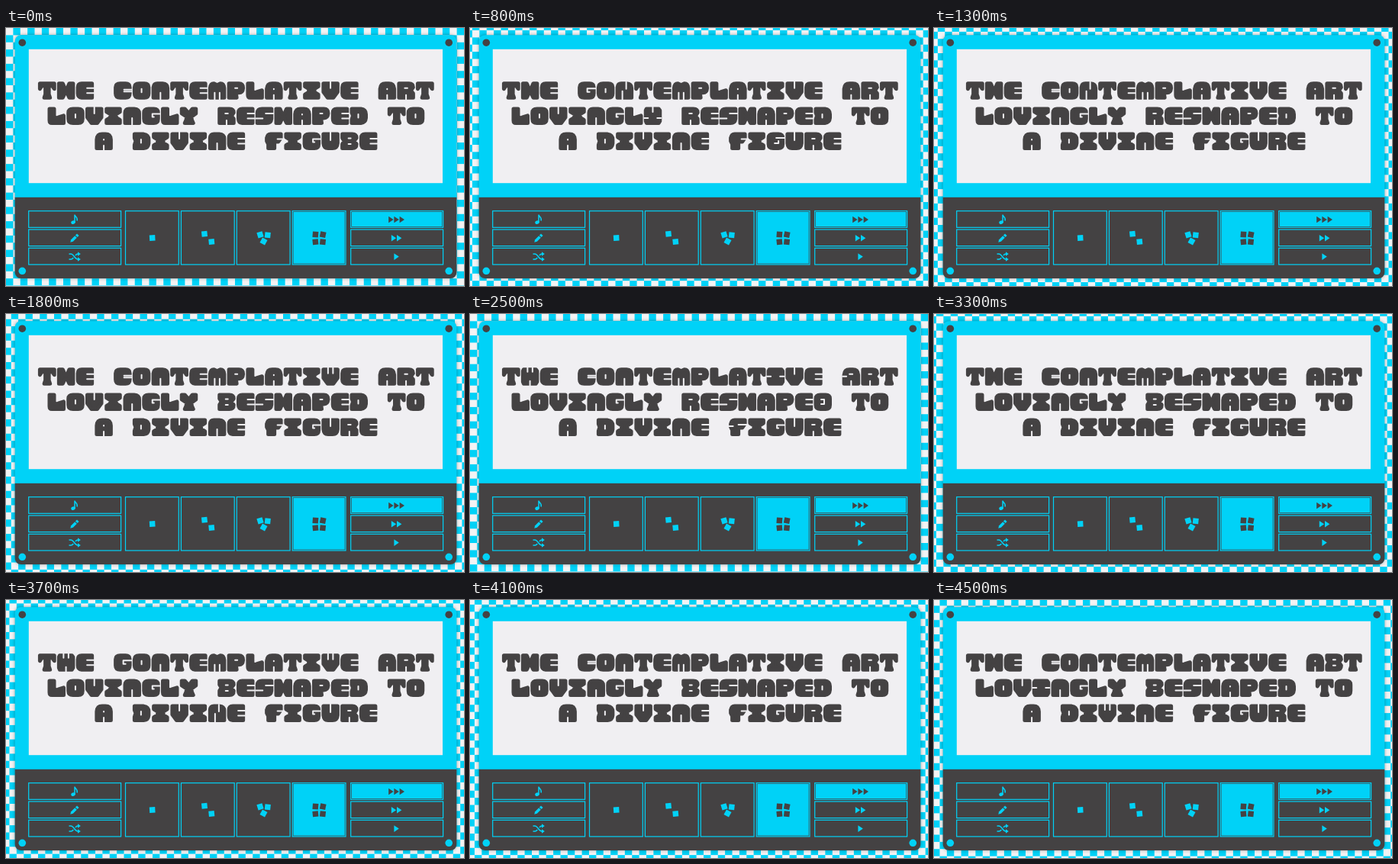
An HTML page with a canvas for the animation above (4.6 s loop, 600 px wide and 338 px high).

```html
<!DOCTYPE html>
<html lang="en">
<head>
<meta charset="utf-8">
<title>Lettering panel</title>
<style>
  html, body { margin: 0; width: 100%; height: 100%; overflow: hidden; background: #f3f3f4; }
  canvas { display: block; width: 100vw; height: 100vh; }
</style>
</head>
<body>
<canvas id="stage" width="600" height="338" role="img"
  aria-label="The contemplative art lovingly reshaped to a divine figure"></canvas>
<script>
const ctx = document.getElementById('stage').getContext('2d');
const CYAN = '#00d2f7', DARK = '#444243', PAPER = '#f0eff2';
const STEP = 100, STEPS = 46, CELL = 9.375, SCROLL = 2500;

// Each letter: body outline, slits, slits of the alternate, optional alternate body.
const block = 'M4 3H20L21.5 5V19L20 21.5H4L3 19V5Z';
const blob = 'M9 3H16Q21.5 3 21.5 8V16Q21.5 21.5 16 21.5H9Q3 21.5 3 16V8Q3 3 9 3Z';
const GLYPHS = {
  A: ['M3 21.5V10Q3.5 3 10 3H14.5Q21 3 21.5 10V21.5Z', 'M12.2 10V10.5M12.2 18V24', 'M1 12H6M10 9H14M12.2 18V24'],
  C: [blob, 'M24 11H14M24 13.5H14', 'M24 9.5H13V14H16'],
  D: ['M3 3H15Q21.5 4 21.5 10V15Q21 21 15 21.5H3V17L4.5 12L3 8Z', 'M11.5 10V14.5', 'M10 9H14V15H10', blob],
  E: ['M8 3H21.5V21.5H8Q3 21 3 16V8Q3 3 8 3Z', 'M24 9H15M24 15.5H15', 'M24 9H11M24 15H11'],
  F: ['M8 3H21.5V8L18 13H13V21.5H5V16L3 12V8Q4 3 8 3Z', 'M24 9.5H17', 'M24 9H13M1 11H6'],
  G: [blob, 'M24 9.5H14V13.5H16', 'M24 8H13M11 15H16V12'],
  H: ['M3 3H8L10.5 9H14L16.5 3H21.5V21.5H16.5L14 16H10.5L8 21.5H3Z', '', 'M9 0V6M15.5 0V6M12.2 24V18', block],
  I: ['M3.5 3H21V7L16 10V14.5L21 17.5V21.5H3.5V17.5L8.5 14.5V10L3.5 7Z', '', 'M1 12H6M18 12H23', block],
  L: ['M3 3H9V13Q12 16 15 14L21.5 12V21.5H6Q3 21.5 3 18Z', '', ''],
  M: ['M3 21.5V9Q3.5 3 8 3L12.2 5L16.5 3Q21 3 21.5 9V21.5Z', 'M9 24V15M15.5 24V15', 'M9 24V11M15.5 24V11'],
  N: ['M3 21.5V8Q3.5 3 8 3H15Q21.5 3.5 21.5 9V21.5Z', 'M12.2 24V15', 'M9.5 24V13M14.5 1V10'],
  O: [blob, 'M12.2 10V14.5', 'M11 10V14M13 10V14'],
  P: ['M3 3H16Q21.5 3 21.5 9Q21 15 16 15H12L13 21.5H3Z', 'M11 9H14', 'M12 8V10'],
  R: ['M3 3H16Q21.5 3 21.5 8L18.5 12.5L21.5 16V21.5H3Z', 'M10.5 9H14M12.2 24V18', 'M11 8.5H14M11 16H14',
      'M3 3H16Q21.5 3 21.5 8L18.5 12L21.5 16Q21.5 21.5 16 21.5H3V16L5.5 12L3 8Z'],
  S: ['M9 3H21.5V16Q21 21.5 15 21.5H3V8Q3.5 3 9 3Z', 'M24 9H14M1 15.5H10', 'M24 9H11M1 15H13'],
  T: ['M2.8 3H21.6V10L19 6H14.5V17L16 21.5H8.5L10 17V6H5.4L2.8 10Z', '', ''],
  U: ['M3 3H21.5V15Q21 21.5 15 21.5H9Q3.5 21.5 3 15Z', 'M12.2 0V11', 'M11 0V12M13 0V12'],
  V: ['M3 3H21.5V14L16 21.5H8.5L3 14Z', 'M12.2 0V9', 'M9 0V8M15.5 0V8'],
  Y: ['M3 3H7L12.2 9L17 3H21.5V9L16 13V17L18 21.5H7L9 17V13L3 9Z', '', 'M12.2 0V7M1 15H6M18 15H23', block]
};
for (const g of Object.values(GLYPHS))
  for (let i = 0; i < 4; i++) g[i] = new Path2D(g[i] ?? g[0]);

const LINES = ['THE CONTEMPLATIVE ART', 'LOVINGLY RESHAPED TO', 'A DIVINE FIGURE'];

// line, column, first and last step of an alternate letter
const SWAPS = [
  [2, 13, 0, 4], [0, 4, 6, 11], [0, 6, 7, 13], [1, 7, 5, 10], [2, 11, 8, 12],
  [1, 9, 15, 21], [0, 15, 17, 19], [0, 1, 23, 27], [0, 14, 22, 26], [0, 18, 24, 29],
  [2, 9, 24, 28], [1, 16, 25, 27], [1, 9, 29, 45], [0, 1, 35, 39], [0, 4, 36, 40],
  [0, 15, 34, 38], [2, 6, 36, 38], [0, 19, 42, 45], [2, 4, 43, 45], [1, 3, 42, 45]
];

function disc(x, y, r, color) {
  ctx.fillStyle = color;
  ctx.beginPath();
  ctx.arc(x, y, r, 0, 7);
  ctx.fill();
}

function rect(x, y, w, h, color) {
  ctx.fillStyle = color;
  ctx.fillRect(x, y, w, h);
}

function poly(color, ...pts) {
  ctx.fillStyle = color;
  ctx.beginPath();
  for (let i = 0; i < pts.length; i += 2) ctx.lineTo(pts[i], pts[i + 1]);
  ctx.fill();
}

// A diagonal move of one cell brings the pattern back to itself.
function checker(t) {
  const shift = t % SCROLL / SCROLL * CELL;
  rect(0, 0, 600, 338, '#f3f3f4');
  ctx.fillStyle = CYAN;
  for (let r = -1; r < 37; r++)
    for (let c = -1; c < 65; c++)
      if ((r + c) % 2) ctx.fillRect(c * CELL + shift, r * CELL + shift, CELL, CELL);
}

function panel() {
  ctx.save();
  ctx.beginPath();
  ctx.roundRect(11.7, 9.2, 578.6, 318.8, 8);
  ctx.shadowColor = 'rgba(0,0,0,.35)';
  ctx.shadowBlur = 4;
  ctx.fillStyle = CYAN;
  ctx.fill();
  ctx.shadowColor = 'transparent';
  ctx.clip();
  rect(11, 221.8, 580, 108, DARK);
  ctx.restore();
  rect(29.8, 27.8, 542.2, 175.4, PAPER);
  for (const x of [21.3, 580.2]) {
    disc(x, 19.2, 4.8, DARK);
    disc(x, 318.3, 4.8, CYAN);
  }
}

function button(x, y, w, h, on) {
  ctx.strokeStyle = CYAN;
  ctx.lineWidth = 1.2;
  ctx.strokeRect(x + .7, y + .7, w - 1.4, h - 1.4);
  if (on) rect(x + 2, y + 2, w - 4, h - 4, CYAN);
}

function tile(x, y, turn, color = CYAN) {
  ctx.save();
  ctx.translate(x, y);
  ctx.rotate(turn);
  rect(-3.7, -3.7, 7.4, 7.4, color);
  ctx.restore();
}

function arrows(n, y, color) {
  for (let i = 0; i < n; i++) {
    const x = 512 + (i - n / 2) * 7.2;
    poly(color, x, y - 4.3, x + 6.4, y, x, y + 4.3);
  }
}

function icons() {
  // note
  ctx.fillStyle = CYAN;
  ctx.beginPath();
  ctx.ellipse(88, 254.7, 2.8, 2.2, -.3, 0, 7);
  ctx.fill();
  ctx.strokeStyle = CYAN;
  ctx.lineWidth = 1.5;
  ctx.stroke(new Path2D('M90 255V244.5C90.5 247.5 94.5 248 93 252.5'));
  // pencil
  poly(CYAN, 84.2, 280.8, 85.2, 277.2, 90.2, 272.2, 92.8, 274.8, 87.8, 279.8);
  poly(CYAN, 90.9, 271.5, 93, 269.4, 95.6, 272, 93.5, 274.1);
  // shuffle
  ctx.stroke(new Path2D('M82.5 296H85C89 296 90 303 94 303H95M82.5 303H85C86.5 303 87.5 302 88.3 301M91 298C91.8 296.8 92.6 296 94 296H95'));
  for (const y of [296, 303]) poly(CYAN, 94, y - 2.8, 97.8, y, 94, y + 2.8);
}

function controls() {
  for (let i = 0; i < 3; i++) {
    const y = 239 + i * 24.3;
    button(29, y, 122.3, 23, i === 3);
    button(451, y, 122.3, 23, i === 0);
    arrows(3 - i, y + 12, i ? CYAN : DARK);
  }
  for (let i = 0; i < 4; i++) button(155.8 + i * 72.9, 239, 71.2, 71.6, i === 3);
  tile(191.7, 275, -.06);
  tile(260, 269.8, -.1);
  tile(269.3, 280, -.1);
  tile(333, 270.8, -.3);
  tile(342.8, 271.2, .1);
  tile(337.5, 279.5, .5);
  tile(405.4, 270.5, .08, DARK);
  tile(415.2, 270.6, .2, DARK);
  tile(405.4, 280.2, -.1, DARK);
  tile(415, 280.2, .1, DARK);
  icons();
}

function lettering(step) {
  const pitch = 24.75;
  ctx.lineJoin = ctx.lineCap = 'round';
  LINES.forEach((line, row) => {
    const left = 301.3 - line.length * pitch / 2;
    [...line].forEach((ch, col) => {
      const g = GLYPHS[ch];
      if (!g) return;
      const alt = SWAPS.some(([r, c, a, b]) => r === row && c === col && step >= a && step <= b);
      const body = g[alt ? 3 : 0], slits = g[alt ? 2 : 1];
      ctx.save();
      ctx.translate(left + col * pitch + .2, 69.7 + row * 33.2);
      ctx.fillStyle = ctx.strokeStyle = DARK;
      ctx.lineWidth = 5;
      ctx.fill(body);
      ctx.stroke(body);
      ctx.strokeStyle = PAPER;
      ctx.lineWidth = 2;
      ctx.stroke(slits);
      ctx.restore();
    });
  });
  ctx.lineJoin = 'miter';
  ctx.lineCap = 'butt';
}

function draw(now) {
  const step = Math.floor(now / STEP) % STEPS;
  checker(step * STEP);
  panel();
  lettering(step);
  controls();
}

const start = performance.now();
function loop() {
  draw(performance.now() - start);
  requestAnimationFrame(loop);
}
loop();
</script>
</body>
</html>
```
